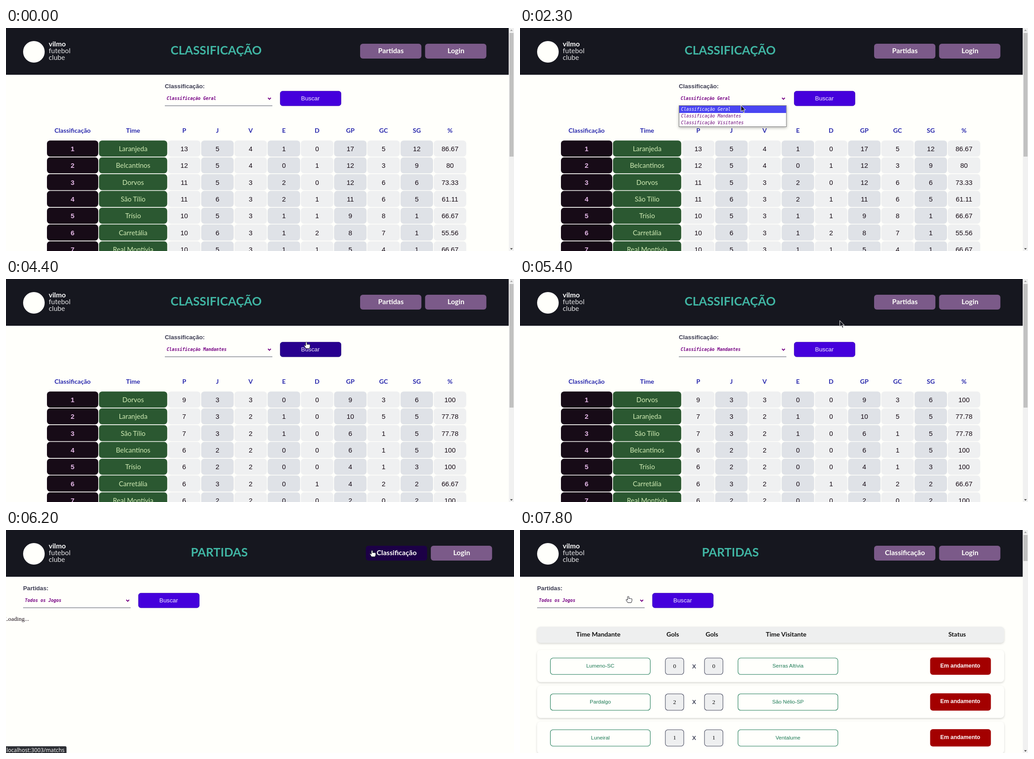
An HTML page for the animation above (8 s loop, 1129 by 496 pixels).

```html
<!DOCTYPE html>
<html lang="pt-BR">
<head>
<meta charset="utf-8">
<title>Classificação</title>
<style>
html, body { margin: 0; width: 100%; height: 100%; overflow: hidden; background: #fffffb; }
svg { display: block; width: 1129px; height: 496px; }
text { white-space: pre; }
.round { font-family: Lato, "Open Sans", sans-serif; font-weight: 700; }
.plain { font-family: Lato, "Open Sans", sans-serif; font-weight: 400; }
.sans { font-family: "Liberation Sans", Arial, sans-serif; }
.bold { font-family: "Liberation Sans", Arial, sans-serif; font-weight: 700; }
.serif { font-family: "Liberation Serif", Times, serif; }
.mono { font-family: "DejaVu Sans Mono", monospace; font-style: italic; }
.value { font-weight: 700; }
.ui { font-family: "Noto Sans", "Open Sans", sans-serif; }
.card { filter: drop-shadow(0 2px 2px rgba(0, 0, 0, .16)); }
.popup { filter: drop-shadow(0 2px 3px rgba(0, 0, 0, .3)); }
</style>
</head>
<body>
<svg id="stage" viewBox="0 0 1129 496" xmlns="http://www.w3.org/2000/svg"></svg>
<script>
const LOOP = 8000, STEP = 100;
const stage = document.getElementById('stage');

// Pointer path: time, x, y of the hot spot
const PATH = [
  [800, 503, 38], [1300, 491, 157], [1600, 491, 157], [1700, 491, 159],
  [2200, 491, 159], [2300, 491, 172], [2600, 480, 194], [3300, 480, 194],
  [3400, 511, 179], [3500, 511, 179], [3800, 668, 140], [5000, 668, 140],
  [5200, 690, 102], [5300, 690, 102], [5900, 814, 45], [6700, 814, 45],
  [7300, 394, 125], [7400, 394, 125], [7800, 241, 147], [8000, 241, 147]
];

const OPTIONS = ['Classificação Geral', 'Classificação Mandantes', 'Classificação Visitantes'];

// Team, wins, draws, losses, goals for, goals against
const OVERALL = [
  ['Laranjeda', 4, 1, 0, 17, 5], ['Belcantinos', 4, 0, 1, 12, 3],
  ['Dorvos', 3, 2, 0, 12, 6], ['São Tílio', 3, 2, 1, 11, 6],
  ['Trísio', 3, 1, 1, 9, 8], ['Carretália', 3, 1, 2, 8, 7],
  ['Real Montívia', 3, 1, 1, 5, 4]
];
const HOME = [
  ['Dorvos', 3, 0, 0, 9, 3], ['Laranjeda', 2, 1, 0, 10, 5],
  ['São Tílio', 2, 1, 0, 6, 1], ['Belcantinos', 2, 0, 0, 6, 1],
  ['Trísio', 2, 0, 0, 4, 1], ['Carretália', 2, 0, 1, 4, 2],
  ['Real Montívia', 2, 0, 0, 2, 0]
];
const GAMES = [
  ['Lumeno-SC', 0, 0, 'Serras Altívia'],
  ['Pardalgo', 2, 2, 'São Nélio-SP'],
  ['Luneiral', 1, 1, 'Ventalume']
];

const rect = (x, y, w, h, fill, r = 0, extra = '') =>
  `<rect x="${x}" y="${y}" width="${w}" height="${h}" rx="${r}" fill="${fill}" ${extra}/>`;

// y is the middle of the capital letters
const label = (s, x, y, size, cls, fill, anchor = 'middle') =>
  `<text x="${x}" y="${y + size * .36}" font-size="${size}" class="${cls}" fill="${fill}" text-anchor="${anchor}">${s}</text>`;

const shape = (d, x, y, attrs) => `<path d="${d}" transform="translate(${x} ${y})" ${attrs}/>`;

const inside = (p, x, y, w, h) => !!p && p.x >= x && p.x <= x + w && p.y >= y && p.y <= y + h;

function pointerAt(t) {
  if (t < PATH[0][0]) return null;
  const i = Math.max(1, PATH.findIndex(k => k[0] >= t));
  const [t0, x0, y0] = PATH[i - 1], [t1, x1, y1] = PATH[i];
  const k = (t - t0) / (t1 - t0);
  return { x: x0 + (x1 - x0) * k, y: y0 + (y1 - y0) * k };
}

function header(title, titleX, link, navX, width, hover) {
  return rect(0, 0, width, 104, '#16171f') +
    '<circle cx="62" cy="53" r="24" fill="#fffffb"/>' +
    label('vilmo', 95, 35.5, 15.5, 'round', '#fff', 'start') +
    label('futebol', 95, 50.5, 15.3, 'plain', '#e4e4e6', 'start') +
    label('clube', 95, 65.5, 15.3, 'plain', '#e4e4e6', 'start') +
    label(title, titleX, 49.6, 26.6, 'round', '#40b5a3') +
    rect(navX, 35, 136.2, 33, hover ? '#1c0046' : '#7b5a89', 6) +
    rect(navX + 144.4, 35, 136.2, 33, '#7b5a89', 6) +
    label(link, navX + 68.5, 50.5, 15.6, 'round', '#fffffb') +
    label('Login', navX + 213, 50.5, 15.6, 'round', '#fffffb');
}

function search(x, name, value, focused, hover) {
  const frame = focused
    ? rect(x + .5, 140, 239, 33.5, '#fff', 3, 'stroke="#101010" stroke-width="2"')
    : rect(x, 172.4, 239, 1.1, '#5b5f70');
  return label(name, x, 129.5, 13.2, 'bold', '#3d3d52', 'start') + frame +
    label(value, x + 4, 157, 9.65, 'mono value', '#760083', 'start') +
    shape('M-3.2-1.6L0 1.7L3.2-1.6', x + 232.5, 156.8, 'fill="none" stroke="#760083" stroke-width="2"') +
    rect(x + 256.4, 140.4, 135.2, 32.6, hover ? '#28008f' : '#4500dc', 5.5,
      `stroke="${hover ? '#20007a' : '#3a00b4'}" stroke-width=".9"`) +
    label('Buscar', x + 323.5, 156.3, 13.3, 'sans', '#f4f1ff');
}

function standings(rows) {
  const colX = i => 359.9 + 73.85 * i;
  let out = label('Classificação', 148, 228, 14.1, 'round', '#2a2aad') +
    label('Time', 282.5, 228, 14.1, 'round', '#2a2aad');
  ['P', 'J', 'V', 'E', 'D', 'GP', 'GC', 'SG', '%'].forEach((s, i) => {
    out += label(s, colX(i) + 36.1, 228, 14.1, 'round', '#2a2aad');
  });
  rows.forEach(([team, v, e, d, gp, gc], i) => {
    const y = 250.3 + 37.35 * i, mid = y + 18.1, pts = 3 * v + e, played = v + e + d;
    const rate = +(pts / played / 3 * 100).toFixed(2);
    out += rect(91, y, 114, 35.7, '#170b17', 7) + rect(206.6, y, 151.7, 35.7, '#2b5831', 7) +
      label(i + 1, 148, mid, 15, 'bold', '#e3b7e6') +
      label(team, 282.5, mid, 15, 'plain', '#cfeab3');
    [pts, played, v, e, d, gp, gc, gp - gc, rate].forEach((n, c) => {
      out += rect(colX(c), y, 72.2, 35.7, c % 2 ? '#dfe2e7' : '#eff0f1', 7) +
        label(n, colX(c) + 36.1, mid, 15, 'sans', '#160a14');
    });
  });
  return out;
}

function matches() {
  const box = (x, y, w, s, fill, color, cls, size) =>
    rect(x, y + 18, w, 36.5, fill, 6, `stroke="${color}" stroke-width="1.1"`) +
    label(s, x + w / 2, y + 35.2, size, cls, cls === 'serif' ? '#111' : color);
  let out = rect(38, 215, 1038, 36, '#eeefef', 8, 'class="card"');
  [['Time Mandante', 174], ['Gols', 339.5], ['Gols', 426.5], ['Time Visitante', 591.5], ['Status', 971.5]]
    .forEach(([s, x]) => { out += label(s, x, 232.3, 14.1, 'round', '#111'); });
  GAMES.forEach(([home, a, b, away], i) => {
    const y = 266.8 + 79.7 * i;
    out += rect(38, y, 1038, 71.5, '#fffffc', 8, 'class="card"') +
      box(67.5, y, 222, home, 'none', '#1d7a55', 'sans', 11.7) +
      box(323, y, 41, a, '#eeeff0', '#44475c', 'serif', 13.4) +
      label('X', 387, y + 36, 13.2, 'bold', '#44475c') +
      box(410, y, 41, b, '#eeeff0', '#44475c', 'serif', 13.4) +
      box(484.5, y, 222, away, 'none', '#1d7a55', 'sans', 11.7) +
      rect(911.5, y + 16.8, 135, 38.4, '#a30000', 6) +
      label('Em andamento', 978.5, y + 34.3, 12.4, 'bold', '#fff');
  });
  return out;
}

function scrollbar(thumb) {
  return rect(1117.5, 0, 11.5, 496, '#f1f1f1') + rect(1119, 11, 9, thumb, '#c1c1c1') +
    shape('M-3 1.7L0-1.7L3 1.7Z', 1123.3, 5, 'fill="#a3a3a3"') +
    shape('M-3-1.7L0 1.7L3-1.7Z', 1123.3, 491.5, 'fill="#505050"');
}

function popup(row) {
  let out = rect(353.5, 172.5, 238.5, 47, '#fff', 0, 'class="popup" stroke="#767676"') +
    rect(354, 173 + 15 * row, 237.5, 16, '#4a45f2');
  OPTIONS.forEach((s, i) => {
    out += label(s, 358, 180.5 + 15 * i, 9.65, 'mono', i === row ? '#fff' : '#6a0076', 'start');
  });
  return out;
}

function statusBar() {
  return '<path d="M0 481H131.5Q134.5 481 134.5 484V496H0Z" fill="#2e3035"/>' +
    label('localhost:3003/matchs', 1, 490, 12.2, 'ui', '#f0f0f0', 'start');
}

const ARROW = 'M0 0V14L3.4 10.8L5.8 16.2L8 15.2L5.7 10.2H10.2Z';
const HAND = 'M5 .5C4 .5 3.5 1.2 3.5 2V9L1.8 7.6C.8 7-.3 8 .4 9L4 14.6H11.6L13.3 10.5V6.5' +
  'C13.3 5.5 11.5 5.2 11.1 6.2C11.1 5.1 9 4.9 8.8 6C8.8 4.9 6.7 4.8 6.5 6V2C6.5 1.1 5.9 .5 5 .5Z';

function cursor(p, hand) {
  if (!p) return '';
  return hand
    ? shape(HAND, p.x - 5.5, p.y, 'fill="#fff" stroke="#16171f" stroke-linejoin="round"')
    : shape(ARROW, p.x, p.y, 'fill="#16171f" stroke="#fff" stroke-width="1" stroke-linejoin="round"');
}

function scene(t) {
  const p = pointerAt(t);
  const games = t >= 6200, loading = games && t < 6300, open = t >= 1600 && t < 3000;
  const navX = loading ? 799.7 : 787, formX = games ? 38 : 353;
  const onLink = inside(p, navX, 35, 136.2, 33);
  const onSearch = inside(p, formX + 256, 140, 136, 33.3);
  const onSelect = inside(p, formX, 140, 239, 33) && !open;
  const width = loading ? 1129 : 1117.5;
  let out = rect(0, 0, 1129, 496, '#fffffb');
  if (games) {
    out += header('PARTIDAS', loading ? 474 : 467.5, 'Classificação', navX, width, onLink) +
      search(formX, 'Partidas:', 'Todos os Jogos', false, onSearch) +
      (loading ? label('Loading...', -3, 197.5, 13.3, 'serif', '#160a14', 'start') : matches() + scrollbar(58));
  } else {
    out += header('CLASSIFICAÇÃO', 467, 'Partidas', navX, width, onLink) +
      search(formX, 'Classificação:', OPTIONS[t < 3000 ? 0 : 1], t >= 3000 && t < 4100, onSearch) +
      standings(t < 4400 ? OVERALL : HOME) + scrollbar(275);
  }
  if (open) out += popup(p.y >= 188 ? 1 : 0);
  if (onLink) out += statusBar();
  return out + cursor(p, onLink || onSearch || onSelect);
}

let shown = -1;
function tick() {
  const t = Math.floor(performance.now() % LOOP / STEP) * STEP;
  if (t !== shown) {
    shown = t;
    stage.innerHTML = scene(t);
  }
  requestAnimationFrame(tick);
}
tick();
</script>
</body>
</html>
```
